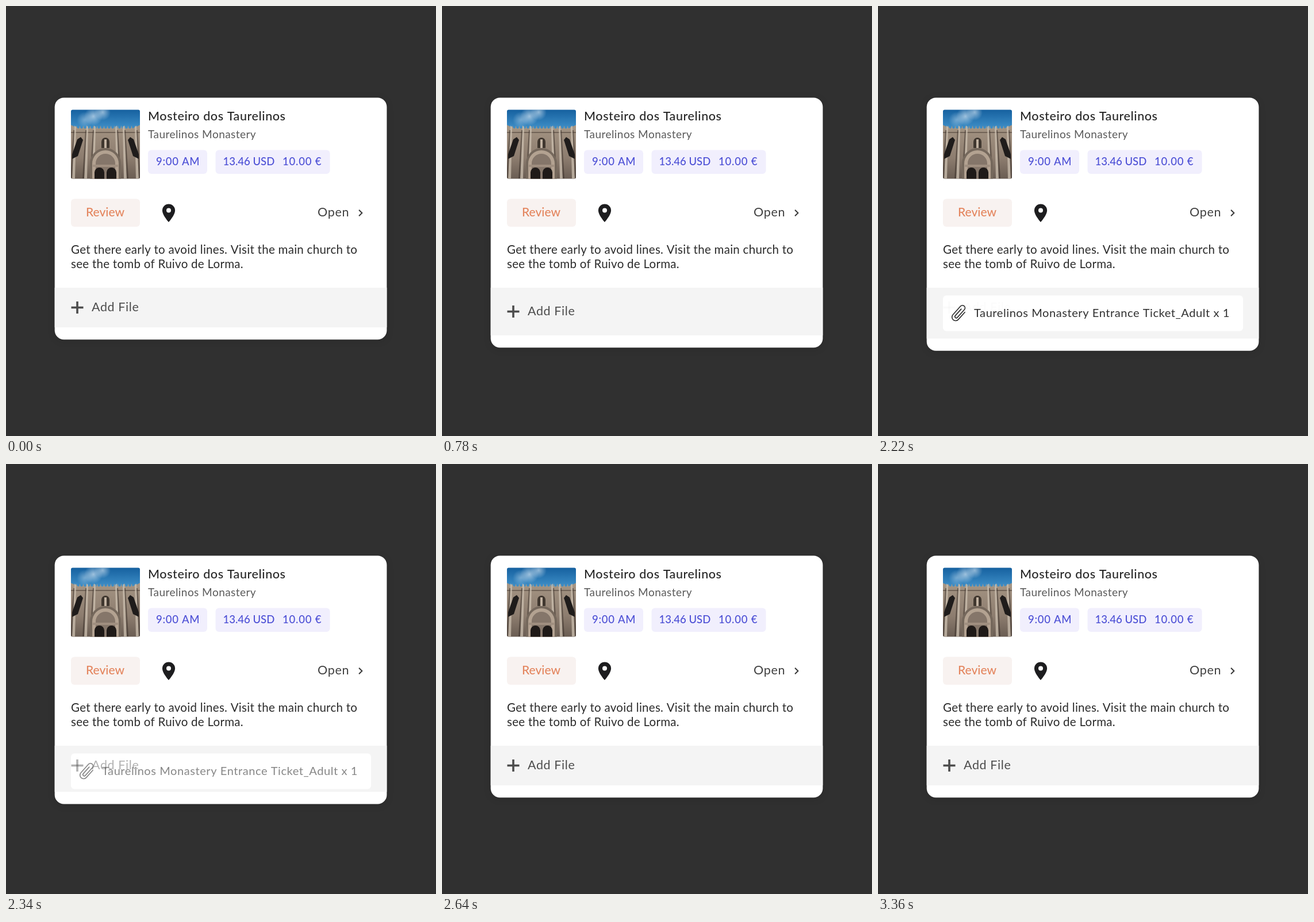
An HTML page with a canvas that plays this animation: 748 px wide and 748 px high, repeating every 3.81 s.

```html
<!DOCTYPE html>
<html lang="en">
<head>
<meta charset="utf-8">
<title>Trip card</title>
<style>
  html, body { margin: 0; width: 100%; height: 100%; overflow: hidden; background: #303030; }
  canvas { display: block; width: 748px; height: 748px; }
</style>
</head>
<body>
<canvas id="stage" width="748" height="748"></canvas>
<script>
const ctx = document.getElementById('stage').getContext('2d');
const LOOP = 3810;
const INK = '#2b2b2b', SOFT = '#4d4d4d', BLUE = '#4d50d6';

// cubic-bezier(0, 0, .58, 1)
function easeOut(x) {
  if (x <= 0) return 0;
  if (x >= 1) return 1;
  let lo = 0, hi = 1, s = 0.5;
  for (let i = 0; i < 20; i++) {
    s = (lo + hi) / 2;
    if (3 * (1 - s) * s * s * 0.58 + s ** 3 < x) lo = s; else hi = s;
  }
  return 3 * (1 - s) * s * s + s ** 3;
}
const phase = (t, start, span) => easeOut((t - start) / span);

function roundBox(x, y, w, h, r, fill) {
  ctx.beginPath();
  ctx.roundRect(x, y, w, h, r);
  ctx.fillStyle = fill;
  ctx.fill();
}

function poly(fill, ...pts) {
  ctx.beginPath();
  for (let i = 0; i < pts.length; i += 2) ctx.lineTo(pts[i], pts[i + 1]);
  ctx.fillStyle = fill;
  ctx.fill();
}

function label(str, x, y, size, color, gap = 0, weight = 400) {
  ctx.font = `${weight} ${size}px Lato, "Open Sans", sans-serif`;
  ctx.letterSpacing = gap + 'px';
  ctx.fillStyle = color;
  ctx.fillText(str, x, y);
}

function archWindow(x, y, w, h, fill) {
  roundBox(x, y, w, h, [w / 2, w / 2, 0, 0], fill);
}

function cloud(x, y, r, alpha) {
  const g = ctx.createRadialGradient(x, y, 0, x, y, r);
  g.addColorStop(0, `rgba(225,238,248,${alpha})`);
  g.addColorStop(1, 'rgba(225,238,248,0)');
  ctx.fillStyle = g;
  ctx.fillRect(x - r, y - r, 2 * r, 2 * r);
}

function photo() {
  ctx.save();
  ctx.beginPath();
  ctx.roundRect(113, 180.5, 120, 120, 3);
  ctx.clip();

  const sky = ctx.createLinearGradient(0, 180, 0, 216);
  sky.addColorStop(0, '#15609f');
  sky.addColorStop(1, '#4293cb');
  ctx.fillStyle = sky;
  ctx.fillRect(113, 180, 120, 40);
  cloud(152, 192, 16, 0.65);
  cloud(168, 185, 14, 0.6);
  cloud(137, 198, 14, 0.4);

  const stone = ctx.createLinearGradient(0, 210, 0, 300);
  stone.addColorStop(0, '#a39382');
  stone.addColorStop(0.6, '#8d7d6f');
  stone.addColorStop(1, '#6a5d53');
  poly(stone, 113, 207, 126, 213, 220, 213, 233, 207, 233, 301, 113, 301);
  for (let x = 115; x < 232; x += 6) poly('#a89887', x, 214, x + 1.5, 208, x + 3, 214);
  ctx.fillStyle = 'rgba(56,46,39,.45)';
  ctx.fillRect(113, 219, 120, 2);

  // buttresses lean towards the middle
  for (const side of [-1, 1]) {
    const at = d => 173 + side * d;
    for (const d of [17, 30, 51]) {
      poly('rgba(205,192,176,.75)', at(d), 210, at(d + 3), 208, at(d + 7), 300, at(d + 2), 300);
      poly('rgba(52,43,37,.5)', at(d + 3), 216, at(d + 5), 216, at(d + 10), 300, at(d + 7), 300);
    }
    poly('#1f1c1b', at(39), 233, at(43), 228, at(49), 232, at(58), 258, at(58), 266, at(48), 261);
  }
  archWindow(166, 229, 14, 18, '#40372f');
  ctx.fillStyle = '#c1b2a1';
  ctx.fillRect(171, 232, 4, 15);

  archWindow(146, 247, 54, 54, '#75685c');
  archWindow(150, 251, 46, 50, '#b3a291');
  archWindow(156, 257, 34, 44, '#85766a');
  ctx.fillStyle = '#a08f80';
  ctx.fillRect(151, 276, 44, 4);
  archWindow(154, 281, 17, 20, '#1f1a18');
  archWindow(175, 281, 17, 20, '#1f1a18');
  ctx.restore();
}

function pin() {
  const x = 283, y = 355.6, r = 11.1;
  ctx.beginPath();
  ctx.moveTo(x, y + 20.5);
  ctx.quadraticCurveTo(x, y + 20.5, x, y + 20.5);
  ctx.bezierCurveTo(x, y + 20.5, x - r, y + 8.3, x - r, y);
  ctx.arc(x, y, r, Math.PI, 0);
  ctx.bezierCurveTo(x + r, y + 8.3, x, y + 20.5, x, y + 20.5);
  ctx.closePath();
  ctx.moveTo(x + 4, y);
  ctx.arc(x, y, 4, 0, 7);
  ctx.fillStyle = '#1d1d1f';
  ctx.fill('evenodd');
}

function chevron() {
  ctx.beginPath();
  ctx.moveTo(614, 354.8);
  ctx.lineTo(619.3, 360);
  ctx.lineTo(614, 365.2);
  ctx.strokeStyle = '#3a3a3a';
  ctx.lineWidth = 2;
  ctx.stroke();
}

function clipIcon(x, y) {
  const q = Math.PI / 2;
  ctx.save();
  ctx.translate(x, y);
  ctx.rotate(-0.84);
  ctx.beginPath();
  ctx.moveTo(8, 6.3);
  ctx.lineTo(-9, 6.3);
  ctx.arc(-9, 0, 6.3, q, 3 * q);
  ctx.lineTo(10.8, -6.3);
  ctx.arc(10.8, -1.8, 4.5, -q, q);
  ctx.lineTo(-7.5, 2.7);
  ctx.arc(-7.5, 0.3, 2.4, q, 3 * q);
  ctx.lineTo(8, -2.1);
  ctx.strokeStyle = INK;
  ctx.lineWidth = 1.7;
  ctx.lineCap = ctx.lineJoin = 'round';
  ctx.stroke();
  ctx.restore();
}

function addFile(mid, alpha) {
  ctx.globalAlpha = alpha;
  ctx.fillStyle = SOFT;
  ctx.fillRect(113.5, mid - 1.8, 21, 3.6);
  ctx.fillRect(122.2, mid - 10.5, 3.6, 21);
  label('Add File', 149, mid + 6.5, 21.5, SOFT, 0.6);
  ctx.globalAlpha = 1;
}

function ticket(alpha) {
  ctx.globalAlpha = Math.min(1, 2 * alpha);
  roundBox(113, 503.5, 522, 62, 6, '#fff');
  ctx.globalAlpha = alpha;
  clipIcon(141, 534.5);
  label('Taurelinos Monastery Entrance Ticket_Adult x 1', 167, 541, 20, INK, 0.58);
  ctx.globalAlpha = 1;
}

function details() {
  photo();
  label('Mosteiro dos Taurelinos', 247, 198.5, 21.5, '#262626', 0.6, 500);
  label('Taurelinos Monastery', 247, 230, 19, '#5a5a5a', 0.45);

  roundBox(247, 250.5, 103, 41.5, 6, '#f1effd');
  roundBox(364.5, 250.5, 199, 41.5, 6, '#f1effd');
  label('9:00 AM', 261, 276.5, 18.5, BLUE, 0.7, 500);
  label('13.46 USD', 377.5, 276.5, 18.5, BLUE, 0, 500);
  label('10.00 €', 481, 276.5, 18.5, BLUE, 0.8, 500);

  roundBox(113, 335.5, 120, 48.5, 6, '#f8f2f0');
  label('Review', 139, 366, 21, '#e4865f', 0, 500);
  pin();
  label('Open', 542, 366, 21.5, '#404040', 0.7);
  chevron();

  label('Get there early to avoid lines. Visit the main church to', 113, 431, 20.5, INK, 0.28);
  label('see the tomb of Ruivo de Lorma.', 113, 456, 20.5, INK, 0.28);
}

function draw(t) {
  const grow = phase(t, 455, 300);
  const attach = phase(t, 1295, 240);
  const reset = phase(t, 2215, 430);
  const bar = 69 + (14 * grow + 6 * attach) * (1 - reset);

  ctx.fillStyle = '#303030';
  ctx.fillRect(0, 0, 748, 748);
  ctx.shadowColor = 'rgba(0,0,0,.12)';
  ctx.shadowBlur = 14;
  ctx.shadowOffsetY = 2;
  roundBox(84.7, 159.6, 577.7, 351.6 + bar, 16, '#fff');
  ctx.shadowColor = 'transparent';

  ctx.fillStyle = '#f4f4f4';
  ctx.fillRect(84.7, 490, 577.7, bar);
  details();

  ticket(attach * (1 - reset));
  if (reset > 0) addFile(524.5, reset);
  else addFile(524.5 + 7 * grow, 1 - attach);
}

const begin = performance.now();
function tick() {
  draw((performance.now() - begin) % LOOP);
  requestAnimationFrame(tick);
}
tick();
</script>
</body>
</html>
```
